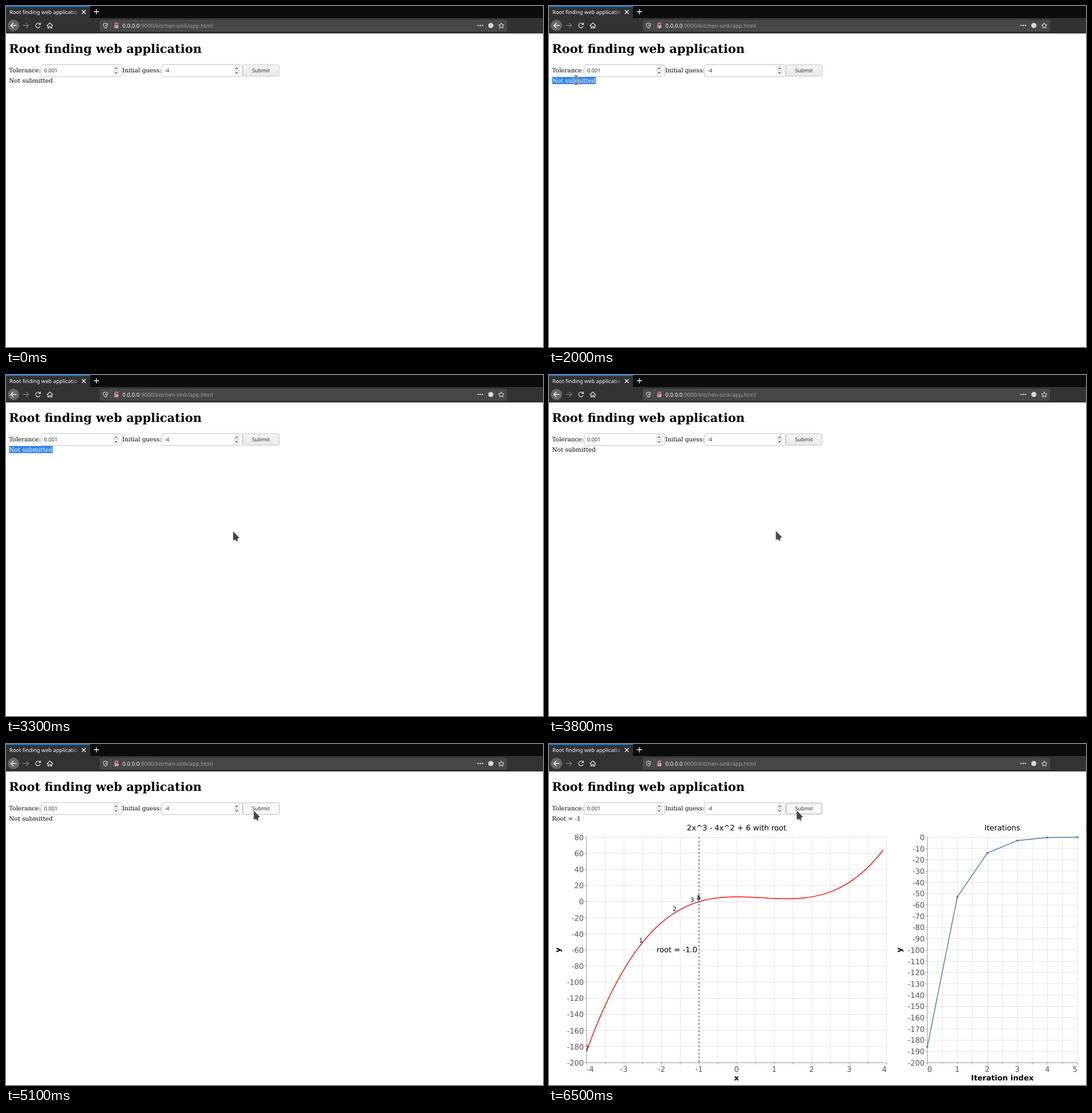
Recreate the animation shown at these times as an HTML page. Size 939x596 px, loop 8000 ms.

```html
<!DOCTYPE html>
<html lang="en">
<head>
<meta charset="utf-8">
<title>Root finding web application</title>
<style>
html, body { margin: 0; width: 100%; height: 100%; overflow: hidden; background: #fff; }
svg { display: block; width: 939px; height: 596px; }
text { text-rendering: geometricPrecision; white-space: pre; }
.ui { font: 9.25px "Noto Sans", sans-serif; }
.page { font: 10.48px "DejaVu Serif", serif; }
.page .h1 { font-size: 20.9px; font-weight: bold; }
.plot { font: 13.1px "DejaVu Sans", sans-serif; }
.icon { fill: none; stroke: #d6d6d8; stroke-width: 1.3; stroke-linecap: round; stroke-linejoin: round; }

.idle, .word, .all, .hover, .press, .focus, .result, .cursor, .arrow, .beam {
  animation: 8s step-end infinite;
}
.idle { animation-name: idle; }
.word { animation-name: word; }
.all { animation-name: all; }
.hover { animation-name: hover; }
.press { animation-name: press; }
.focus { animation-name: focus; }
.result { animation-name: result; }
.cursor { animation-name: move; }
.arrow { animation-name: arrow; }
.beam { animation-name: beam; }

@keyframes idle { 0% { visibility: visible } 81.25%, 100% { visibility: hidden } }
@keyframes result { 0% { visibility: hidden } 81.25%, 100% { visibility: visible } }
@keyframes word { 0%, 23.75%, 100% { visibility: hidden } 22.5% { visibility: visible } }
@keyframes all { 0%, 43.75%, 100% { visibility: hidden } 23.75% { visibility: visible } }
@keyframes hover { 0% { visibility: hidden } 62.5%, 100% { visibility: visible } }
@keyframes press { 0%, 77.5%, 100% { visibility: hidden } 75% { visibility: visible } }
@keyframes focus { 0% { visibility: hidden } 75%, 100% { visibility: visible } }
@keyframes beam { 0%, 33.75%, 100% { visibility: hidden } 12.5% { visibility: visible } }
@keyframes arrow { 0%, 12.5% { visibility: hidden } 11.25%, 33.75%, 100% { visibility: visible } }
@keyframes move {
  0% { transform: translate(-40px, 127px) }
  11.25% { transform: translate(0px, 127px) }
  12.5% { transform: translate(19px, 132px) }
  13.75% { transform: translate(38px, 130px) }
  15% { transform: translate(47.5px, 129.5px) }
  33.75% { transform: translate(48px, 141px) }
  35% { transform: translate(54px, 160px) }
  36.25% { transform: translate(67.5px, 182px) }
  37.5% { transform: translate(135px, 216px) }
  38.75% { transform: translate(250px, 250px) }
  40% { transform: translate(355px, 269px) }
  41.25% { transform: translate(397px, 273px) }
  47.5% { transform: translate(396.5px, 272px) }
  48.75% { transform: translate(397px, 266px) }
  50% { transform: translate(400px, 250px) }
  51.25% { transform: translate(405px, 226px) }
  52.5% { transform: translate(411px, 200px) }
  53.75% { transform: translate(418px, 174px) }
  55% { transform: translate(424px, 152px) }
  56.25% { transform: translate(428px, 137px) }
  57.5% { transform: translate(429px, 129px) }
  58.75% { transform: translate(429.5px, 128px) }
  60% { transform: translate(430px, 126px) }
  61.25% { transform: translate(431px, 123.5px) }
  62.5% { transform: translate(432px, 119px) }
  63.75%, 100% { transform: translate(433px, 116px) }
}
</style>
</head>
<body>
<svg viewBox="0 0 939 596">
  <defs>
    <linearGradient id="fade"><stop stop-color="#323234" stop-opacity="0"/><stop offset="1" stop-color="#323234"/></linearGradient>
    <linearGradient id="face" x2="0" y2="1"><stop stop-color="#f6f5f4"/><stop offset="1" stop-color="#e9e8e6"/></linearGradient>
    <clipPath id="plotClip"><rect x="65.5" y="163" width="525" height="394"/></clipPath>
    <g id="spin">
      <rect x="61.5" y="102.5" width="141" height="21" rx="2.8" fill="#fff" stroke="#c4c2c0"/>
      <rect x="188.3" y="104.5" width="8.6" height="8.2" rx="2.2" fill="#f8f8f7" stroke="#cfcdcb" stroke-width=".8"/>
      <rect x="188.3" y="112.7" width="8.6" height="8.2" rx="2.2" fill="#f8f8f7" stroke="#cfcdcb" stroke-width=".8"/>
      <path d="M190.6 109.8l2-1.9 2 1.9M190.6 115.6l2 1.9 2-1.9" fill="none" stroke="#2e3436" stroke-width="1.1"/>
    </g>
  </defs>

  <!-- browser chrome -->
  <g class="ui">
    <path d="M0 0H939V21H0z" fill="#0c0c0d"/>
    <path d="M0 0H147V21H939V48H0z" fill="#323234"/>
    <path d="M0 0H147V1.6H0z" fill="#0a84ff"/>
    <text x="6" y="14" fill="#f9f9fa" textLength-none="" clip-path="inset(0 0 0 0)"><tspan>Root finding web applicatio</tspan></text>
    <path d="M114 3H130V20H114z" fill="url(#fade)"/>
    <g class="icon">
      <path d="M133 7.5l6 6m0-6l-6 6M154 10h8.4m-4.2-4.2v8.4" stroke="#f0f0f2"/>
      <circle cx="13" cy="34" r="10" fill="#67676a" stroke="none"/>
      <path d="M18 34H8.5m4.2-4.3L8.4 34l4.3 4.3" stroke="#f4f4f5"/>
      <path d="M30 34h9.5m-4.2-4.3l4.3 4.3-4.3 4.3" stroke="#77777a"/>
      <path d="M59.6 36a4.1 4.1 0 1 1-.6-4.8"/>
      <path d="M60.6 29.2v3.6H57z" fill="#d6d6d8" stroke-width=".5"/>
      <path d="M71.8 34.2l4.9-4.7 4.9 4.7M73.3 33.7v4.8h2.2v-2.7h2.4v2.7h2.2v-4.8"/>
      <rect x="164.5" y="24.5" width="711" height="19.5" rx="2" fill="#474749" stroke="#525255" stroke-width=".8"/>
      <path d="M174 29.7l3.7 1.2c0 4-1 6.3-3.7 7.9-2.7-1.6-3.7-3.9-3.7-7.9z" stroke-width="1.1"/>
      <path d="M174 31.9v4.5c1-.9 1.6-2 1.7-3.9z" fill="#d6d6d8" stroke="none"/>
      <path d="M183.5 26.5v15" stroke="#626265" stroke-width=".8"/>
      <rect x="189.4" y="33.4" width="7" height="5.2" rx=".8" fill="#c2c2c4" stroke="none"/>
      <path d="M190.8 33.4v-1.6a2.1 2.1 0 0 1 4.2 0v1.6" stroke="#c2c2c4"/>
      <path d="M188.6 38.6l8.4-8.8" stroke="#ff2c55" stroke-width="1.5"/>
      <path d="M866 29.5l1.45 3 3.25.45-2.35 2.3.55 3.25-2.9-1.55-2.9 1.55.55-3.25-2.35-2.3 3.25-.45z" stroke-width="1.1"/>
    </g>
    <g fill="#d6d6d8">
      <circle cx="825.4" cy="34" r="1.3"/><circle cx="829.2" cy="34" r="1.3"/><circle cx="833" cy="34" r="1.3"/>
      <circle cx="847.7" cy="34" r="4.6"/>
    </g>
    <text x="203.6" y="37.6" font-size="9.72" fill="#f9f9fa">0.0.0.0<tspan fill="#a1a1a3">:9000/kitchen-sink/app.html</tspan></text>
  </g>

  <!-- page -->
  <g class="page">
    <text class="h1" x="5.2" y="82">Root finding web application</text>
    <text x="5.2" y="116.3">Tolerance:</text>
    <text x="203.2" y="116.3">Initial guess:</text>
    <text class="idle" x="5.2" y="134">Not submitted</text>
    <text class="result" x="5.2" y="134">Root = -1</text>
    <g class="word" fill="#fff">
      <path d="M28.3 124H82V136.5H28.3z" fill="#3584e4"/>
      <text x="5.2" y="134"><tspan fill="none">Not </tspan>submitted</text>
    </g>
    <g class="all" fill="#fff">
      <path d="M5.2 124H82V136.5H5.2z" fill="#3584e4"/>
      <text x="5.2" y="134">Not submitted</text>
    </g>
  </g>
  <g class="ui" fill="#2e3436">
    <use href="#spin"/><use href="#spin" x="210.7"/>
    <text x="66.6" y="116">0.001</text>
    <text x="277.4" y="116">-4</text>
    <g stroke="#c6c3c0">
      <rect x="414.3" y="102.8" width="63.4" height="20" rx="2.5" fill="url(#face)"/>
      <rect class="hover" x="414.3" y="102.8" width="63.4" height="20" rx="2.5" fill="#f8f8f7"/>
      <rect class="press" x="414.3" y="102.8" width="63.4" height="20" rx="2.5" fill="#d8d5d2"/>
      <rect class="focus" x="416.2" y="104.7" width="59.6" height="16.2" rx="1.5" fill="none" stroke="#aaa9a7" stroke-width=".8" stroke-dasharray="1.3 .8"/>
    </g>
    <text x="445.8" y="116" text-anchor="middle" font-size="9.35">Submit</text>
  </g>

  <g class="plot result" id="charts">
    <circle cx="944.5" cy="146" r="8.5" fill="#fff" stroke="#e6e6e6"/>
  </g>

  <g class="cursor">
    <g class="arrow">
      <path d="M.6 1.4V17.4L4.6 16 8.4 20.2 8.9 13.6 12 12.3z" fill="#000" opacity=".13"/>
      <path d="M0 0V16.2L3.9 14.9 7.6 19.3 8.1 12.8 11.2 11.4z" fill="#464646" stroke="#fff" stroke-opacity=".55" stroke-width=".6"/>
    </g>
    <g class="beam" fill="none" stroke-linecap="round">
      <path id="ibeam" d="M-2.8 -7.3Q0 -7.3 0 -5.5V5.5Q0 7.3 -2.8 7.3M2.8 -7.3Q0 -7.3 0 -5.5M2.8 7.3Q0 7.3 0 5.5" stroke="#fff" stroke-width="3" stroke-opacity=".75"/>
      <path d="M-2.8 -7.3Q0 -7.3 0 -5.5V5.5Q0 7.3 -2.8 7.3M2.8 -7.3Q0 -7.3 0 -5.5M2.8 7.3Q0 7.3 0 5.5" stroke="#3c3c3c" stroke-width="1.3"/>
    </g>
  </g>
</svg>
<script>
const root = document.getElementById('charts');
const TOP = 163, BOTTOM = 557;

function add(tag, attrs, text, parent = root) {
  const el = document.createElementNS('http://www.w3.org/2000/svg', tag);
  for (const k in attrs) el.setAttribute(k, attrs[k]);
  if (text !== undefined) el.textContent = text;
  return parent.appendChild(el);
}
const label = (x, y, s, anchor, more) => add('text', { x, y, 'text-anchor': anchor, ...more }, s);
const path = (d, stroke, width, more) =>
  add('path', { d, fill: 'none', stroke, 'stroke-width': width, ...more });
const trace = pts => 'M' + pts.map(p => p.map(v => v.toFixed(2)).join(' ')).join('L');

// Draws grid, axes and titles; returns the two scales.
function chart({ left, right, x0, x1, y0, y1, yStep, title, xTitle, yTitleX }) {
  const sx = x => left + (x - x0) / (x1 - x0) * (right - left);
  const sy = y => BOTTOM - (y - y0) / (y1 - y0) * (BOTTOM - TOP);
  let grid = '', ticks = `M${left} ${TOP}V${BOTTOM}H${right}`;
  for (let x = x0; x <= x1; x += 0.5) {
    grid += `M${sx(x)} ${TOP}V${BOTTOM}`;
    ticks += `M${sx(x)} ${BOTTOM}v3.3`;
    if (x % 1 === 0) {
      const anchor = x === x0 ? 'start' : x === x1 ? 'end' : 'middle';
      label(sx(x), 572.6, x, anchor, { fill: '#555' });
    }
  }
  for (let y = y0; y <= y1; y += yStep) {
    grid += `M${left} ${sy(y)}H${right}`;
    ticks += `M${left} ${sy(y)}h-3.3`;
    label(left - 4.6, sy(y) + 4.8, y, 'end', { fill: '#555' });
  }
  path(grid, '#ddd', 0.8);
  path(ticks, '#888', 0.8);
  const mid = (left + right) / 2;
  label(mid, 151, title, 'middle');
  label(mid, 588, xTitle, 'middle', { 'font-weight': 'bold' });
  label(0, 0, 'y', 'middle', { 'font-weight': 'bold', transform: `translate(${yTitleX} 360) rotate(-90)` });
  return { sx, sy };
}

const f = x => 2 * x ** 3 - 4 * x ** 2 + 6;
const slope = x => 6 * x ** 2 - 8 * x;
const guesses = [-4];
for (let i = 0; i < 5; i++) {
  const x = guesses[i];
  guesses.push(x - f(x) / slope(x));
}

const a = chart({ left: 65.5, right: 590.5, x0: -4, x1: 4, y0: -200, y1: 80, yStep: 20,
  title: '2x^3 - 4x^2 + 6 with root', xTitle: 'x', yTitleX: 20 });
const curve = Array.from({ length: 80 }, (_, i) => -4 + i / 10);
path(trace(curve.map(x => [a.sx(x), a.sy(f(x))])), '#f00', 1.4);
path(`M${a.sx(-1)} ${TOP}V${BOTTOM}`, '#333', 1.3, { 'stroke-dasharray': '2.6 3.9' });
label(259.3, 364, 'root = -1.0', 'end');
const marks = add('g', { 'clip-path': 'url(#plotClip)', 'font-size': 10.48 });
guesses.forEach((x, i) => {
  const px = a.sx(x), py = a.sy(f(x));
  add('circle', { cx: px, cy: py, r: 1.5, fill: '#4c78a8', opacity: 0.7 }, undefined, marks);
  add('text', { x: px, y: py - 3.3, 'text-anchor': 'middle' }, i, marks);
});

const b = chart({ left: 661.5, right: 924, x0: 0, x1: 5, y0: -200, y1: 0, yStep: 10,
  title: 'Iterations', xTitle: 'Iteration index', yTitleX: 616.5 });
const steps = guesses.map((x, i) => [b.sx(i), b.sy(f(x))]);
path(trace(steps), '#4c78a8', 1.4);
for (const [cx, cy] of steps) add('circle', { cx, cy, r: 1.8, fill: '#4c78a8' });
</script>
</body>
</html>
```
